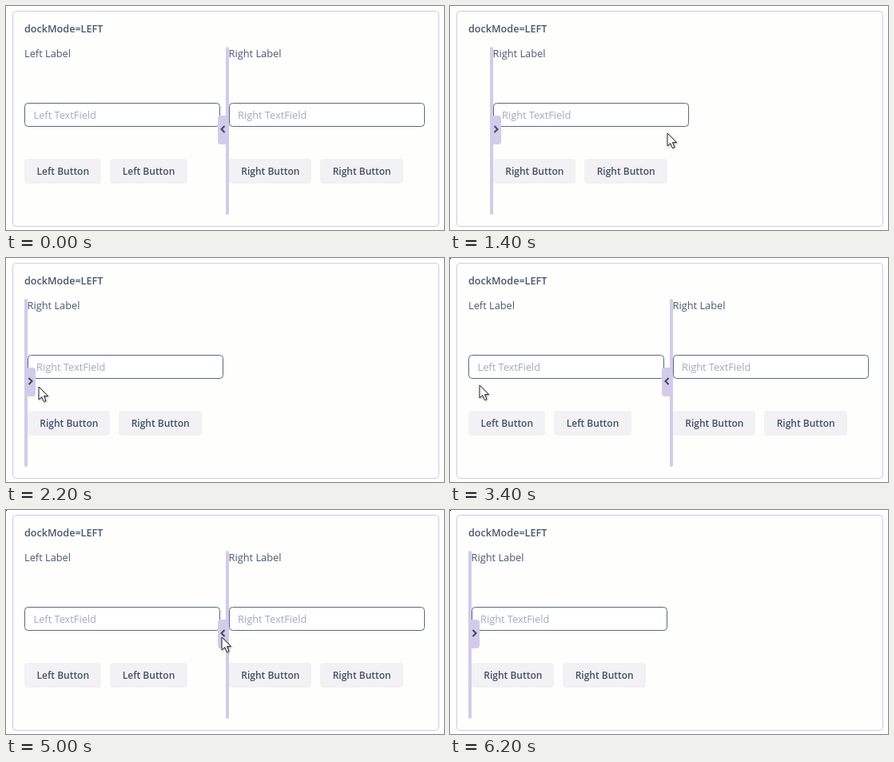
Animation of 548x280 px, one loop 6.8 s. Source, as an HTML page:

```html
<!DOCTYPE html>
<html lang="en">
<head>
<meta charset="utf-8">
<title>Dockable split layout</title>
<style>
  html, body { margin: 0; width: 100%; height: 100%; overflow: hidden; background: #fff; }
  svg { display: block; width: 548px; height: 280px; }
  text { font: 12.8px "Open Sans", "Noto Sans", sans-serif; fill: #4a5a70; }
  .title { font-size: 12.6px; font-weight: 600; fill: #47556b; }
  .hint { fill: #a0abbc; }
  .field { fill: #fff; stroke: #5b6980; }
  .button { fill: #f2f2f5; }
  .caption { font-size: 12px; font-weight: 600; fill: #454f66; text-anchor: middle; }
  .bar { fill: #d2cbea; }
  .chevron { fill: none; stroke: #3e4a60; stroke-width: 2; }
  .pointer { fill: #fff; stroke: #20222c; stroke-linejoin: round; filter: drop-shadow(1px 1px 1px #0005); }

  .left, .right, .open, .docked, .hover, .arrow, .hand, .dot {
    animation: 6800ms step-end infinite;
  }
  .left, .open { animation-name: open; }
  .docked { animation-name: docked; }
  .right { animation-name: slide; }
  .hover { animation-name: hover; }
  .arrow { animation-name: arrow; }
  .hand { animation-name: hand; }
  .dot { animation-name: dot; }

  @keyframes open {
    0%, 50% { visibility: visible; }
    20.58%, 82.35%, 100% { visibility: hidden; }
  }
  @keyframes docked {
    0%, 50% { visibility: hidden; }
    20.58%, 82.35%, 100% { visibility: visible; }
  }
  @keyframes slide {
    0%, 50% { transform: translateX(0); }
    20.58%, 82.35% { transform: translateX(-225px); }
    23.52%, 85.29%, 100% { transform: translateX(-252px); }
  }
  @keyframes hover {
    0%, 29.41%, 100% { fill: #f2f2f5; }
    26.47% { fill: #cbcbcc; }
  }
  @keyframes hand {
    0%, 29.41%, 100% { visibility: hidden; }
    26.47% { visibility: visible; }
  }
  @keyframes dot {
    0% { visibility: hidden; }
    41.17%, 100% { visibility: visible; }
  }
  @keyframes arrow {
    0% { transform: translate(-40px, 0); }
    5.88% { transform: translate(262px, 232px); }
    8.82% { transform: translate(268px, 190px); }
    11.76% { transform: translate(271px, 166px); }
    14.7% { transform: translate(272px, 159px); }
    23.52% { transform: translate(260px, 188px); }
    26.47% { transform: translate(-40px, 0); }
    29.41% { transform: translate(130px, 184px); }
    32.35% { transform: translate(41px, 161px); }
    35.29% { transform: translate(37px, 159px); }
    55.88% { transform: translate(60px, 178px); }
    58.82% { transform: translate(122px, 205px); }
    61.76% { transform: translate(200px, 262px); }
    64.7% { transform: translate(250px, 215px); }
    67.64% { transform: translate(262px, 185px); }
    70.58% { transform: translate(267px, 165px); }
    73.52% { transform: translate(270px, 159px); }
    85.29% { transform: translate(276px, 205px); }
    88.23% { transform: translate(286px, 255px); }
    91.17%, 100% { transform: translate(-40px, 0); }
  }
</style>
</head>
<body>
<svg viewBox="0 0 548 280">
  <rect x="8.5" y="6.5" width="533" height="269" rx="4" fill="#fefefd" stroke="#cfc9e8"/>
  <text class="title" x="23" y="33">dockMode=LEFT</text>

  <g class="left">
    <text x="23" y="64">Left Label</text>
    <rect class="field" x="23.5" y="121.5" width="244" height="29" rx="4"/>
    <text class="hint" x="34.5" y="141">Left TextField</text>
    <rect class="button" x="23" y="191" width="96" height="31" rx="4"/>
    <text class="caption" x="71.3" y="211">Left Button</text>
    <rect class="button" x="130" y="191" width="97" height="31" rx="4"/>
    <text class="caption" x="178.5" y="211">Left Button</text>
  </g>

  <g class="right">
    <text x="278.6" y="64">Right Label</text>
    <rect class="field" x="279.5" y="121.5" width="244" height="29" rx="4"/>
    <text class="hint" x="290" y="141">Right TextField</text>
    <rect class="button" x="279" y="191" width="103" height="31" rx="4"/>
    <text class="caption" x="330.8" y="211">Right Button</text>
    <rect class="button hover" x="393" y="191" width="104" height="31" rx="4"/>
    <text class="caption" x="445.2" y="211">Right Button</text>

    <rect class="bar" x="275" y="51" width="4" height="210" rx="2"/>
    <g class="open">
      <path class="bar" d="M276 137h-7q-4 0-4 4v28q0 4 4 4h7z"/>
      <path class="chevron" d="M273.5 150l-4 4 4 4"/>
    </g>
    <g class="docked">
      <path class="bar" d="M278 137h7q4 0 4 4v28q0 4-4 4h-7z"/>
      <path class="chevron" d="M280.5 150l4 4-4 4"/>
    </g>
  </g>

  <path class="pointer arrow" d="M0 0V16L3.7 12.6 6.4 18.6 9 17.4 6.4 11.6H11.5Z"/>
  <g class="hand">
    <path class="pointer" d="M220.5 219q0-1.8 1.6-1.8t1.6 1.8v6q2.7-1.2 3 .6 2.5-1 2.9.8 2.9-.8 2.9 2v4q0 2.5-1.7 4.6v2.6h-8.3v-2.4l-5.6-7q-1.4-2.2.6-2.6 1.4-.2 3 2z"/>
  </g>
  <rect class="dot" width="1" height="1"/>
</svg>
</body>
</html>
```
